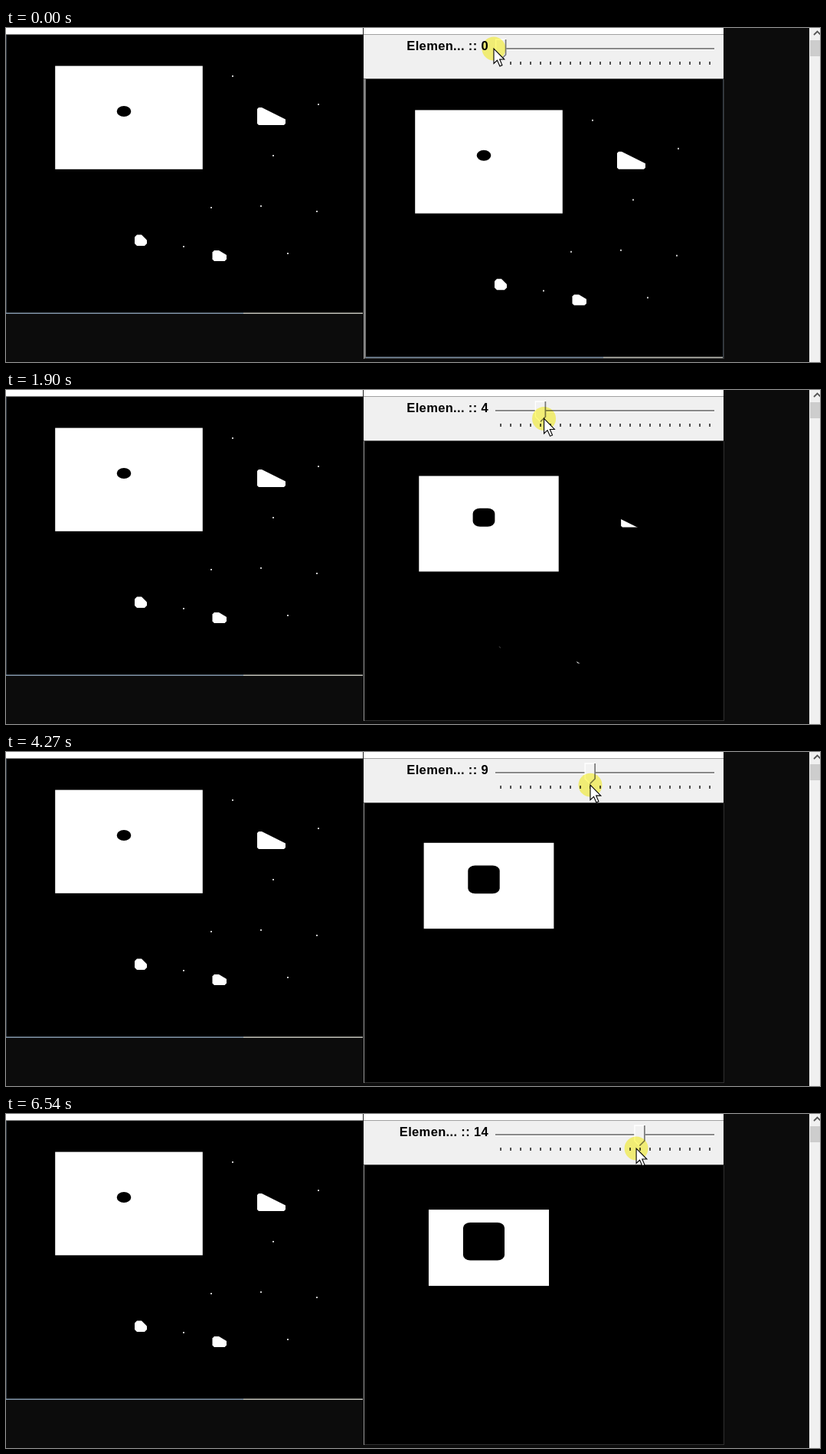
These frames come from a looping animation (1063 px wide and 437 px high, 6560 ms). An HTML page with a canvas:

```html
<!DOCTYPE html>
<html lang="en">
<head>
<meta charset="utf-8">
<title>Erosion slider</title>
<style>
html, body { margin: 0; width: 100%; height: 100%; overflow: hidden; background: #0c0c0c; }
canvas { display: block; }
</style>
</head>
<body>
<canvas id="stage" width="1063" height="437"></canvas>
<script>
const ctx = document.getElementById('stage').getContext('2d');
const LOOP = 6560;
const PIXEL = 1.268;  // stage pixels per image pixel
const STEP = 12.95;   // distance between slider values
const BEAT = 696;     // one drag and the short rest after it
const DRAG = 0.87;    // share of a beat spent dragging

// Pointer x at the rest before each drag, and after the last one
const rests = [637, 660, 686, 705, 723, 741.5, 763, 782, 796, 816, 832];

const dots = [[296, 63], [408, 100], [349, 167], [268, 235], [333, 233], [406, 240], [232, 286], [368, 295]];

function box(color, x, y, w, h) {
  ctx.fillStyle = color;
  ctx.fillRect(x, y, w, h);
}

function trace(points) {
  ctx.beginPath();
  points.forEach(([x, y]) => ctx.lineTo(x, y));
}

// A box with small bevels and one large cut at the top right.
// Eroding a convex shape by a square leaves the overlap of its diagonal shifts.
function erodedBlob(x, y, w, h, cutX, cutY, bevel, s) {
  const r = x + w, b = y + h;
  const points = [
    [x, y + bevel], [x + bevel, y], [r - cutX, y], [r, y + cutY],
    [r, b - bevel], [r - bevel, b], [x + bevel, b], [x, b - bevel]
  ];
  ctx.save();
  if (s) {
    for (const dx of [s, -s]) for (const dy of [s, -s]) {
      trace(points.map(([px, py]) => [px + dx, py + dy]));
      ctx.clip();
    }
  }
  trace(points);
  ctx.fillStyle = '#fff';
  ctx.fill();
  ctx.restore();
}

function picture(ox, oy, value) {
  const s = value * PIXEL;
  ctx.save();
  ctx.translate(ox, oy);
  box('#fff', 64.2 + s, 49.6 + s, 192.6 - 2 * s, 135.2 - 2 * s);
  ctx.beginPath();
  ctx.roundRect(144.7 - s, 102 - s, 18.6 + 2 * s, 14 + 2 * s, { x: 9.3, y: 7 });
  ctx.fillStyle = '#000';
  ctx.fill();
  erodedBlob(328, 104, 37, 23, 31, 15.5, 2, s);
  erodedBlob(168, 270.5, 16, 14.5, 7, 7, 3, s);
  erodedBlob(269.5, 291, 18.5, 14, 10, 6, 2.4, s);
  if (!value) {
    dots.forEach(([x, y]) => box('#c8c8c8', x - 1, y - 1, 2, 2));
    box('#8498ac', 0, 372.5, 310, 1.5);
    box('#c4c4bc', 310, 372.5, 156, 1.5);
  }
  ctx.restore();
}

function slider(value) {
  ctx.font = 'bold 16.5px "Liberation Sans", Arial, sans-serif';
  ctx.letterSpacing = '0.35px';
  ctx.textAlign = 'right';
  ctx.fillStyle = '#000';
  ctx.fillText('Elemen... :: ' + value, 630, 29);

  box('#888', 639, 26, 286, 2);
  box('#fff', 639, 28, 286, 1);
  for (let i = 0; i < 22; i++) box('#1c1c1c', 645.3 + 13 * i, 44, 1.5, 4);

  const right = 652.6 + STEP * value, left = right - 13, middle = right - 6.5;
  trace([[left, 15], [right, 15], [right, 35], [middle, 41.5], [left, 35]]);
  ctx.closePath();
  ctx.fillStyle = '#f2f2f2';
  ctx.fill();
  ctx.lineWidth = 1.3;
  ctx.strokeStyle = '#fff';
  ctx.stroke();
  trace([[right, 15], [right, 35], [middle, 41.5]]);
  ctx.lineWidth = 1.7;
  ctx.strokeStyle = '#777';
  ctx.stroke();
}

function pointer(x, y) {
  ctx.save();
  ctx.globalCompositeOperation = 'multiply';
  ctx.fillStyle = '#fffb7c';
  ctx.beginPath();
  ctx.arc(x, y, 15.5, 0, 2 * Math.PI);
  ctx.fill();
  ctx.restore();

  ctx.save();
  ctx.translate(x, y);
  ctx.scale(1.22, 1.22);
  trace([[0, 0], [0, 16], [3.7, 12.5], [6.5, 18.8], [9, 17.7], [6.3, 11.5], [11.3, 11.5]]);
  ctx.closePath();
  ctx.fillStyle = '#fff';
  ctx.fill();
  ctx.lineWidth = 0.9;
  ctx.strokeStyle = '#000';
  ctx.stroke();
  ctx.restore();
}

function windows(value) {
  box('#0c0c0c', 0, 0, 1063, 437);
  box('#fff', 0, 0, 937, 8);
  box('#222', 466, 0, 1, 9);

  box('#777', 0, 8, 466, 1);
  box('#000', 0, 9, 466, 365);
  box('#36404a', 0, 9, 1, 365);
  picture(0, 0, 0);

  box('#a0a0a0', 467, 8, 470, 1);
  box('#f0f0f0', 467, 9, 470, 57);
  box('#606060', 467, 66, 470, 1);
  box('#000', 467, 67, 470, 366);
  box('#999', 467, 67, 1, 366);
  box('#303030', 468, 432, 470, 1);
  box('#303030', 937, 67, 1, 366);
  if (!value) {
    box('#777', 468, 67, 2, 365);
    box('#36404a', 936, 67, 1, 365);
  }
  picture(470, 57.8, value);

  box('#f0f0f0', 1049, 0, 14, 437);
  box('#cdcdcd', 1050, 16, 13, 21);
  trace([[1055, 9], [1059.5, 4.5], [1064, 9]]);
  ctx.lineWidth = 1.8;
  ctx.strokeStyle = '#555';
  ctx.stroke();
}

// Each drag slows into its rest; the hand sinks along a flattening arc.
function pointerAt(t) {
  const beats = Math.max(0, (t - 100) / BEAT);
  const i = Math.floor(beats);
  const ease = Math.sin(Math.min(1, (beats - i) / DRAG) * Math.PI / 2);
  const x = rests[i] + (rests[i + 1] - rests[i]) * ease;
  const y = 45 - 18 * ((823 - x) / 186) ** 2;
  return [x, y];
}

function draw(now) {
  const [x, y] = pointerAt(now % LOOP);
  const value = Math.max(0, Math.floor((x - 638.1) / 13));
  windows(value);
  slider(value);
  pointer(x, y);
}

function frame() {
  draw(performance.now());
  requestAnimationFrame(frame);
}
frame();
</script>
</body>
</html>
```
